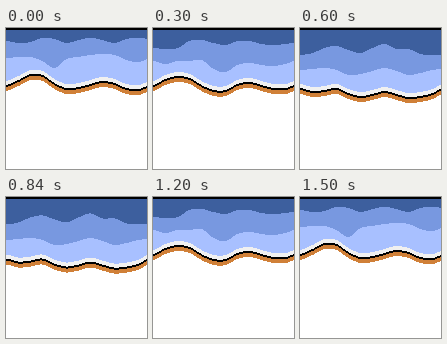
Animation of 141x141 px, one loop 1.56 s. Source, as an HTML page with a canvas:

```html
<!DOCTYPE html>
<html lang="en">
<head>
<meta charset="utf-8">
<title>Shoreline</title>
<style>
  html, body { margin: 0; width: 100%; height: 100%; overflow: hidden; background: #fff; }
  canvas { display: block; width: 141px; height: 141px; image-rendering: pixelated; }
</style>
</head>
<body>
<canvas id="sea" width="141" height="141"></canvas>
<script>
const SIZE = 141, STEP = 12, TICK = 60, TICKS = 26;
const ctx = document.getElementById('sea').getContext('2d');
const shift = (row, d) => row.map(y => y + d);

// Each edge: poses [tick, heights every 12 px]
const deepLow = [27, 25, 20, 18, 22, 25, 20, 16, 21, 21, 26, 27, 27];
const deep = [
  [0, [13, 15, 14, 10, 11, 15, 12, 10, 12, 15, 11, 10, 11]],
  [5, [20, 21, 20, 13, 12, 15, 17, 13, 13, 16, 17, 16, 14]],
  [8, shift(deepLow, -3)],
  [10, deepLow],
  [12, shift(deepLow, 0.8)]
];
const midLow = [42, 41, 40, 42, 47, 46, 43, 40, 43, 47, 45, 42, 41];
const mid = [
  [0, [30, 29, 29, 33, 40, 31, 29, 27, 26, 27, 32, 34, 30]],
  [5, [33, 36, 33, 33, 32, 41, 44, 37, 35, 37, 38, 36, 32]],
  [8, shift(midLow, -3)],
  [10, midLow],
  [12, shift(midLow, 2)]
];
const coastLow = [60, 63, 62, 60, 65, 68, 66, 63, 66, 69, 68, 65, 59];
const coast = [
  [0, [57, 52, 46, 47, 55, 60, 59, 56, 53, 55, 60, 61, 57]],
  [5, [57, 51, 48, 50, 57, 62, 62, 56, 54, 57, 60, 60, 56]],
  [8, [57, 52, 54, 53, 57, 64, 66, 60, 57, 60, 61, 60, 55]],
  [10, coastLow],
  [12, shift(coastLow, 3)]
];

function poseAt(edge, p) {
  let i = 0;
  while (i < edge.length - 2 && edge[i + 1][0] <= p) i++;
  const [t0, a] = edge[i], [t1, b] = edge[i + 1];
  const u = (p - t0) / (t1 - t0);
  return a.map((y, n) => y + (b[n] - y) * u);
}

// Smooth curve through evenly spaced heights
function heightAt(row, x) {
  const i = Math.min(Math.floor(x / STEP), row.length - 2), u = x / STEP - i;
  const b = row[i], c = row[i + 1];
  const a = row[i - 1] ?? b, d = row[i + 2] ?? c;
  const y = b + u * ((c - a) / 2 + u * (a - 2.5 * b + 2 * c - d / 2 + u * (1.5 * (b - c) + (d - a) / 2)));
  return Math.round(y);
}

function draw(p) {
  const [d, m, c] = [deep, mid, coast].map(edge => poseAt(edge, p));
  ctx.fillStyle = '#fff';
  ctx.fillRect(0, 0, SIZE, SIZE);
  for (let x = 0; x < SIZE; x++) {
    const shore = heightAt(c, x);
    const bands = [
      ['#000', 2],
      ['#3d5f9e', heightAt(d, x)],
      ['#7898e0', heightAt(m, x)],
      ['#a8c0ff', shore - 4],
      ['#f0f0f0', shore],
      ['#000', shore + 2],
      ['#d08038', shore + 6]
    ];
    let top = 0;
    for (const [color, bottom] of bands) {
      ctx.fillStyle = color;
      ctx.fillRect(x, top, 1, bottom - top);
      top = bottom;
    }
  }
}

let start, last = -1;
function loop(now) {
  start ??= now;
  const k = Math.floor((now - start) / TICK) % TICKS;
  const p = Math.min(k, TICKS - 1 - k);
  if (p !== last) draw(last = p);
  requestAnimationFrame(loop);
}
draw(0);
requestAnimationFrame(loop);
</script>
</body>
</html>
```
